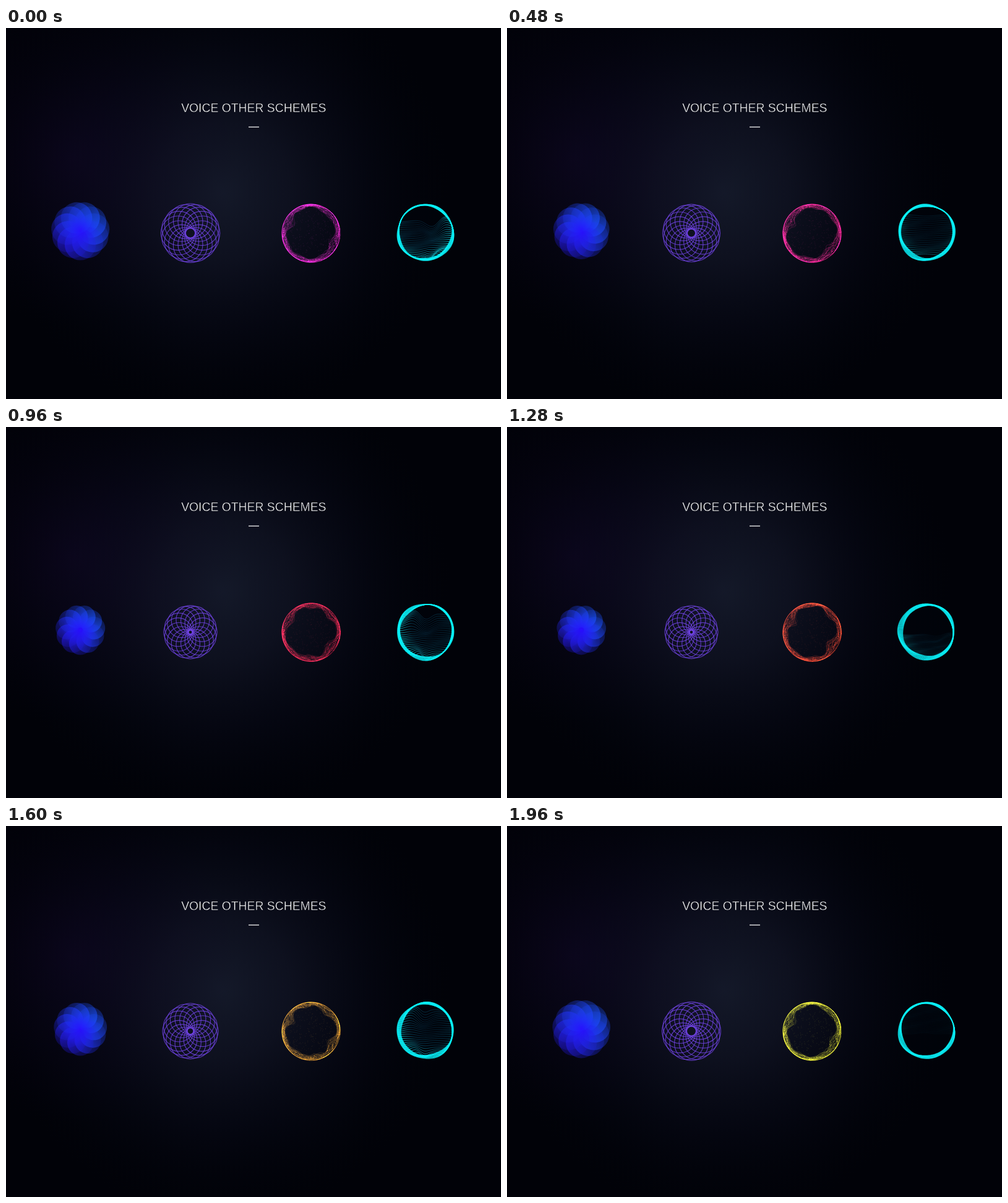
An HTML page with a canvas that plays this animation: 800 px wide and 600 px high, repeating every 2 s.

```html
<!DOCTYPE html>
<html lang="en">
<head>
<meta charset="utf-8">
<title>Voice other schemes</title>
<style>
html, body { margin: 0; width: 100%; height: 100%; overflow: hidden; background: #010208; }
canvas, svg { position: absolute; left: 0; top: 0; width: 800px; height: 600px; }
text {
  font: 19.35px "Liberation Sans", Arial, sans-serif;
  fill: #fff; stroke: #060913; stroke-width: .4px; text-anchor: middle;
}
</style>
</head>
<body>
<canvas id="stage" width="800" height="600"></canvas>
<svg viewBox="0 0 800 600">
  <text x="400.3" y="135.6">VOICE OTHER SCHEMES</text>
  <rect x="392" y="159.5" width="17" height="1.3" fill="#f4f4f4"/>
</svg>
<script>
const LOOP = 2000, STEP = 40, TAU = Math.PI * 2;
const ctx = document.getElementById('stage').getContext('2d');
const rad = deg => deg * Math.PI / 180;
const bump = (a, deg, sharp) => Math.exp(sharp * (Math.cos(a - rad(deg)) - 1));

function seeded(seed) {
  return () => (seed = (seed * 16807) % 2147483647) / 2147483647;
}

// Linear interpolation through rows whose first entry is the time.
function sample(rows, t) {
  let i = 1;
  while (i < rows.length - 1 && rows[i][0] < t) i++;
  const a = rows[i - 1], b = rows[i], f = (t - a[0]) / (b[0] - a[0]);
  return a.map((v, k) => v + (b[k] - v) * f).slice(1);
}

function withStops(gradient, stops) {
  stops.forEach(([at, color]) => gradient.addColorStop(at, color));
  return gradient;
}

function glow(x, y, r, stops) {
  ctx.fillStyle = withStops(ctx.createRadialGradient(x, y, 0, x, y, r), stops);
  ctx.fillRect(0, 0, 800, 600);
}

function circle(x, y, r) {
  ctx.beginPath();
  ctx.arc(x, y, r, 0, TAU);
}

function closedCurve(radius, steps = 140) {
  ctx.beginPath();
  for (let i = 0; i < steps; i++) {
    const a = i / steps * TAU, r = radius(a);
    ctx.lineTo(r * Math.cos(a), r * Math.sin(a));
  }
  ctx.closePath();
  ctx.stroke();
}

function at(x, y, draw) {
  ctx.save();
  ctx.translate(x, y);
  draw();
  ctx.restore();
}

function drawBackground() {
  ctx.fillStyle = '#010208';
  ctx.fillRect(0, 0, 800, 600);
  glow(350, 265, 370, [
    [0, 'rgba(20,25,41,1)'], [.3, 'rgba(15,18,33,.9)'],
    [.62, 'rgba(7,9,22,.6)'], [1, 'rgba(2,4,12,0)']
  ]);
  glow(110, 210, 270, [[0, 'rgba(20,8,46,.42)'], [1, 'rgba(10,4,28,0)']]);
}

const breath = t => Math.cos((t - 140) / LOOP * TAU);

function drawBlossom(t) {
  const count = 11, dist = 22, r = 21.7 + 4 * breath(t);
  const core = ctx.createRadialGradient(0, 0, 0, 0, 0, 30);
  ctx.fillStyle = withStops(core, [[0, 'rgba(38,14,255,1)'], [1, 'rgba(30,20,220,0)']]);
  circle(0, 0, 30);
  ctx.fill();
  for (let i = 0; i < count; i++) {
    const a = (i + .5) / count * TAU - Math.PI / 2;
    const light = .5 + .5 * Math.cos(a + rad(50));
    const color = `${34 - 8 * light},${22 + 58 * light},${222 + 28 * light}`;
    ctx.save();
    ctx.rotate(a);
    ctx.translate(dist, 0);
    ctx.fillStyle = withStops(ctx.createLinearGradient(r * .5, -r * .85, -r * .5, r * .85), [
      [0, `rgba(${color},.22)`], [.5, `rgba(${color},.4)`], [1, `rgba(${color},.72)`]
    ]);
    circle(0, 0, r);
    ctx.fill();
    ctx.restore();
  }
  const heart = ctx.createRadialGradient(0, 0, 0, 0, 0, 28);
  ctx.fillStyle = withStops(heart, [
    [0, 'rgba(40,14,255,.9)'], [.4, 'rgba(38,18,255,.5)'], [1, 'rgba(34,30,250,0)']
  ]);
  circle(0, 0, 28);
  ctx.fill();
}

function drawSpirograph(t) {
  const count = 16, dist = 20, r = 25.3 + 2.6 * breath(t);
  ctx.strokeStyle = 'rgba(116,70,236,.75)';
  ctx.lineWidth = 1.15;
  for (let i = 0; i < count; i++) {
    const a = i / count * TAU;
    circle(dist * Math.cos(a), dist * Math.sin(a), r);
    ctx.stroke();
  }
}

// time, hue, saturation, lightness
const HAZE_COLORS = [
  [0, 313, 82, 40], [280, 324, 84, 42], [720, 341, 88, 42], [960, 350, 86, 41],
  [1280, 371, 86, 40], [1600, 397, 86, 37], [1960, 419, 80, 40]
];

function drawHaze(t) {
  const [hue, sat, lum] = sample(HAZE_COLORS, t);
  const rand = seeded(77), phase = t / LOOP * TAU, R = 47;
  const depth = a => 5 + 9 * bump(a, 207, 30) + 8 * bump(a, 32, 14)
    + 4 * bump(a, 318, 20) + 1.5 * bump(a, 95, 5)
    + 2 * Math.sin(5 * a + 2 * phase) * Math.sin(3 * a - phase);
  const tone = alpha => `hsla(${hue},${sat}%,${lum}%,${alpha})`;

  ctx.globalCompositeOperation = 'lighter';
  ctx.lineWidth = .9;
  ctx.strokeStyle = tone(.13);
  for (let i = 0; i < 34; i++) {
    const u = Math.pow(rand(), 1.3), p = rand() * 2.4, q = rand() * TAU;
    const k = 4 + Math.floor(rand() * 3);
    closedCurve(a => R - depth(a) * Math.max(0, u
      + .26 * Math.sin(k * a + p + phase) + .12 * Math.sin((k + 9) * a + q - 2 * phase)));
  }
  ctx.strokeStyle = tone(.6);
  ctx.lineWidth = 1;
  closedCurve(() => R);

  for (let i = 0; i < 650; i++) {
    const a = rand() * TAU + .08 * Math.sin(phase + i);
    const r = R - depth(a) * rand();
    ctx.fillStyle = tone(.1 + .4 * rand());
    ctx.fillRect(r * Math.cos(a), r * Math.sin(a), 1, 1);
  }
  ctx.fillStyle = tone(.12);
  for (let i = 0; i < 240; i++) {
    const a = rand() * TAU + .2 * Math.sin(phase + i), r = 42 * Math.sqrt(rand());
    ctx.fillRect(r * Math.cos(a), r * Math.sin(a), 1, 1);
  }
}

// time, line strength, wave centre, wave height, top, bottom, rim width, rim angle
const WAVE_POSES = [
  [0, 1, .5, -12, -.4, .9, 3.8, 50],
  [280, 1, .25, -3, -.7, .92, 4.5, 85],
  [720, .12, -.3, 3, -.5, .6, 6, 150],
  [960, .95, -.22, 13, -.6, .88, 5, 150],
  [1280, .3, .6, -5, .1, .85, 7, 160],
  [1600, .95, -.3, 11, -.75, .85, 6, 140],
  [1960, .15, .1, 2, -.85, .1, 5, 110],
  [2000, 1, .5, -12, -.4, .9, 3.8, 50]
];

function drawWaves(t) {
  const [strength, cx, height, top, bottom, rim, rimAngle] = sample(WAVE_POSES, t);
  const R = 45.5, lines = 24, phase = t / LOOP * TAU, tilt = rad(rimAngle);
  const darkX = -12 * Math.cos(tilt), darkY = -12 * Math.sin(tilt);
  const edge = withStops(ctx.createRadialGradient(darkX, darkY, 10, darkX, darkY, R + 10), [
    [0, 'rgba(8,56,84,.5)'], [.5, 'rgba(10,90,120,.6)'], [1, 'rgba(24,240,250,1)']
  ]);

  ctx.save();
  circle(0, 0, R);
  ctx.fillStyle = 'rgba(1,4,10,.7)';
  ctx.fill();
  ctx.clip();
  ctx.strokeStyle = edge;
  ctx.lineWidth = .95;
  ctx.globalAlpha = strength;
  for (let i = 0; i < lines; i++) {
    const v = top + (bottom - top) * i / (lines - 1);
    const half = Math.sqrt(1 - v * v);
    const lift = height * half * (.55 + .45 * Math.sin(i * .27 + 1));
    ctx.beginPath();
    for (let s = -1; s <= 1.001; s += .05) {
      const d = s - cx;
      const y = v * R + lift * Math.sin(Math.PI * 1.4 * d) * Math.exp(-3.2 * d * d)
        + .8 * Math.sin(4 * s + i * .7 + phase);
      ctx.lineTo(s * half * R, y);
    }
    ctx.stroke();
  }
  ctx.restore();

  ctx.strokeStyle = 'rgba(10,246,252,.72)';
  ctx.lineWidth = 1.3;
  const layers = 10;
  for (let i = 0; i < layers; i++) {
    const u = i / (layers - 1);
    closedCurve(a => R
      - rim * u * (.68 + .32 * Math.cos(a - tilt))
      + .8 * Math.sin(3 * a + phase + u * 2)
      + .5 * Math.sin(5 * a - 2 * phase + u * 3));
  }
}

function render(t) {
  drawBackground();
  at(120.2, 328.3, () => drawBlossom(t));
  at(298, 331.7, () => drawSpirograph(t));
  at(493, 332, () => drawHaze(t));
  at(678, 331, () => drawWaves(t));
}

function tick() {
  render(Math.floor(performance.now() / STEP) * STEP % LOOP);
  requestAnimationFrame(tick);
}
tick();
</script>
</body>
</html>
```
